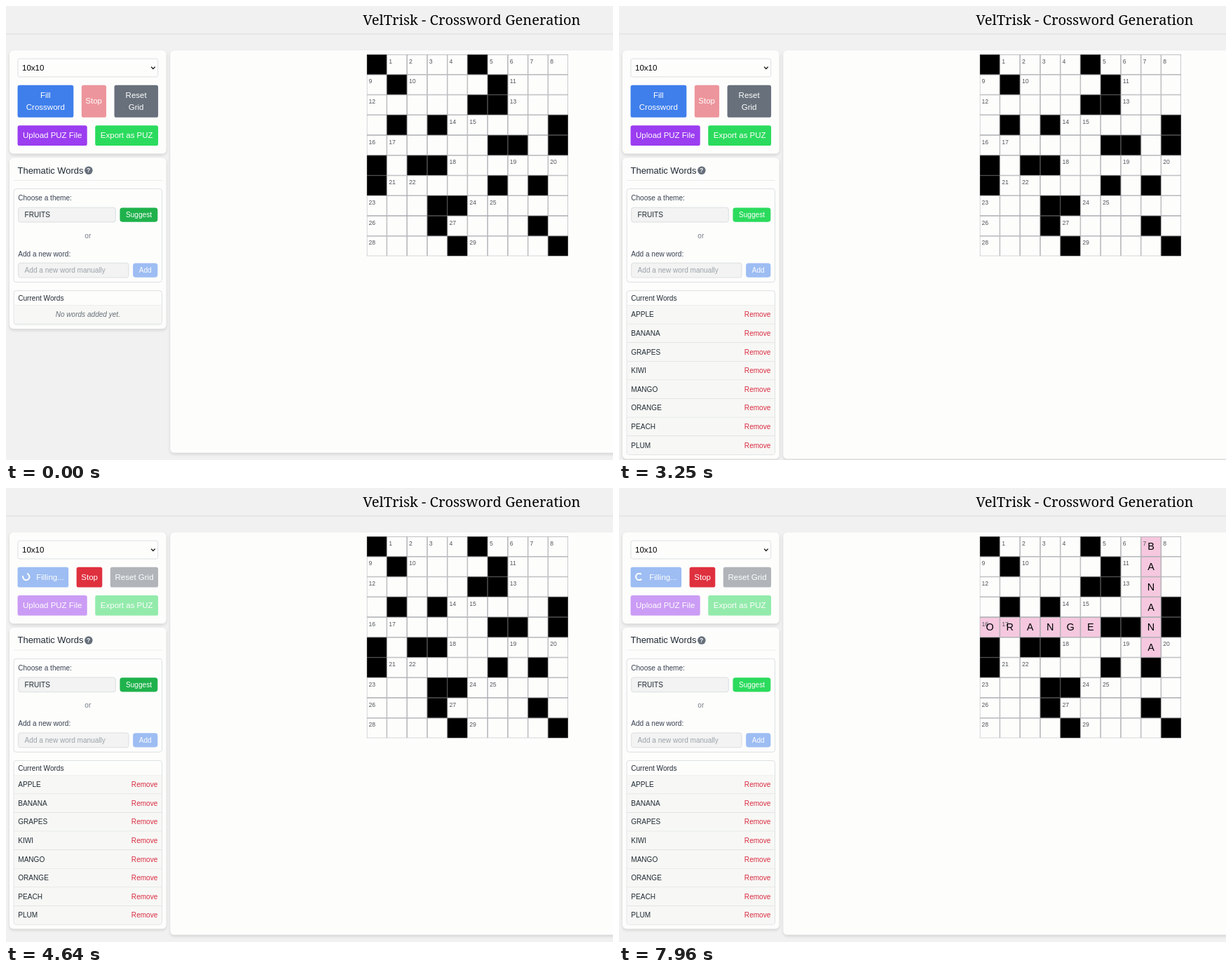
An HTML page that plays this animation: 866 by 647 pixels, repeating every 7.99 s.

```html
<!DOCTYPE html>
<html lang="en">
<head>
<meta charset="utf-8">
<title>Crossword Generation</title>
<style>
  html, body { margin: 0; width: 100%; height: 100%; overflow: hidden; }
  * { box-sizing: border-box; }
  #stage { position: relative; width: 866px; height: 647px; overflow: hidden; background: #f0f1f0; }
  /* The page is laid out at full size and shown reduced. */
  #page {
    position: absolute; left: 0; top: 0; width: 1849px; height: 901px;
    transform: scale(.71875); transform-origin: 0 0;
    color: #1f2933; font: 16px/24px "Liberation Sans", Arial, sans-serif;
    --blue: #3f7fec; --green: #2bdb5d; --line: #d0d5d9;
  }
  header {
    height: 56px; border-bottom: 1px solid #cfd4d7;
    font: 28px/55px "Noto Serif", serif; color: #000; text-align: center;
  }
  .card { background: #fdfdfc; border-radius: 8px; box-shadow: 0 3px 6px rgba(0, 0, 0, .12); }
  aside { position: absolute; left: 7px; top: 88px; width: 311px; }
  main { position: absolute; left: 326px; right: 0; top: 88px; height: 798px; }
  .wide aside { width: 342px; }
  .wide main { left: 357px; }
  .long main { height: 810px; }

  .controls { padding: 16px; display: flex; flex-direction: column; gap: 16px; }
  .select {
    position: relative; height: 37px; padding-left: 8px; color: #000;
    border: 1px solid var(--line); border-radius: 4px; line-height: 35px;
  }
  .select svg { position: absolute; right: 4px; top: 13px; }
  .row { display: flex; gap: 16px; }
  .button {
    padding: 8px; border-radius: 4px; color: #fff; text-align: center;
    background: var(--color);
  }
  .row .button { flex: 1 1 auto; display: flex; align-items: center; justify-content: center; }
  #fill { --color: color-mix(in srgb, #2259de var(--hover, 0%), var(--blue)); }
  #stop { --color: #df303e; }
  #reset { --color: #67707b; }
  #upload { --color: #9b3df0; }
  #export { --color: var(--green); }
  .spinner {
    display: none; flex: none; width: 16px; height: 16px; margin: -3px 12px 0 0;
    border: 3px solid #fff; border-top-color: transparent; border-radius: 50%;
  }
  .filling .spinner { display: block; }

  .words { margin-top: 8px; padding: 8px; }
  h2 {
    margin: 0 0 16px; height: 37px; padding: 0 0 2px 8px; display: flex; align-items: center;
    border-bottom: 1px solid #e3e6e6; font-size: 18px; font-weight: 400;
  }
  h2 i {
    width: 16px; height: 16px; margin-left: 2px; border-radius: 50%; background: #67707b;
    color: #fff; font: bold 12px/16px "Liberation Sans", Arial, sans-serif; text-align: center;
  }
  .box { border: 1px solid var(--line); border-radius: 5px; font-size: 14px; line-height: 20px; }
  .theme { padding: 8px; color: #374151; }
  .line { display: flex; align-items: center; gap: 8px; margin-top: 8px; }
  .input {
    flex: 1; padding: 4px 12px; border: 1px solid var(--line); border-radius: 5px;
    background: #f2f3f2; color: #1f2933; white-space: nowrap;
  }
  .input.fixed { flex: 0 0 194px; }
  .input.hint { color: #9ca3ab; }
  .line .button { flex: none; padding: 4px 12px; border-radius: 5px; }
  #suggest { --color: color-mix(in srgb, #1fb24c var(--hover, 0%), var(--green)); }
  #add { --color: var(--blue); opacity: .5; }
  .or { margin: 16px 0; text-align: center; color: #757d86; }
  .list { margin-top: 16px; overflow: hidden; }
  .list div { display: flex; justify-content: space-between; padding: 8px; border-bottom: 1px solid #d5dadc; }
  .list .head { padding: 4px 8px; border-color: #e6e9e6; }
  .list .item { background: #f7f8f5; }
  .list .item:last-child { border-bottom: 0; }
  .item b { font-weight: 400; color: #d92b42; }
  .list .none { justify-content: center; font-style: italic; color: #666e78; }
  .list .word, .filled .none { display: none !important; }
  .filled .list .word { display: flex !important; }

  #grid { position: absolute; left: 716px; top: 96px; }
  .wide #grid { left: 734px; }
  #grid rect { fill: #fdfdfc; stroke: #a9abae; }
  #grid .black { fill: #000; stroke: #333; }
  #grid .placed rect { fill: #f5c8df; }
  #grid .number { font-size: 12px; fill: #50555a; }
  #grid .letter { font-size: 20px; fill: #000; text-anchor: middle; }
</style>
</head>
<body>
<div id="stage"><div id="page">
  <header>VelTrisk - Crossword Generation</header>
  <aside>
    <section class="card controls">
      <div class="select">10x10
        <svg width="10" height="10" fill="none" stroke="#111" stroke-width="1.8"><path d="M1 2.5 5 6.5 9 2.5"/></svg>
      </div>
      <div class="row">
        <div class="button" id="fill"><span class="spinner"></span><span class="label"></span></div>
        <div class="button" id="stop">Stop</div>
        <div class="button" id="reset">Reset Grid</div>
      </div>
      <div class="row">
        <div class="button" id="upload">Upload PUZ File</div>
        <div class="button" id="export">Export as PUZ</div>
      </div>
    </section>
    <section class="card words">
      <h2>Thematic Words<i>?</i></h2>
      <div class="box theme">
        <div>Choose a theme:</div>
        <div class="line"><div class="input fixed">FRUITS</div><div class="button" id="suggest"></div></div>
        <div class="or">or</div>
        <div>Add a new word:</div>
        <div class="line"><div class="input hint">Add a new word manually</div><div class="button" id="add">Add</div></div>
      </div>
      <div class="box list">
        <div class="head">Current Words</div>
        <div class="item none">No words added yet.</div>
      </div>
    </section>
  </aside>
  <main class="card"></main>
  <svg id="grid" width="400" height="400"></svg>
</div></div>
<script>
const LOOP = 7990, FADE = 150, CELL = 40;
const SUGGEST = 380, WORDS = 2520, FILL = 3720;
const $ = id => document.getElementById(id);
const page = $('page'), grid = $('grid');
const list = document.querySelector('.list');
const spinner = document.querySelector('.spinner');
const fillLabel = document.querySelector('#fill .label');

for (const word of 'APPLE BANANA GRAPES KIWI MANGO ORANGE PEACH PLUM'.split(' ')) {
  list.insertAdjacentHTML('beforeend', `<div class="item word">${word}<b>Remove</b></div>`);
}

const pattern = [
  '#....#....', '.#....#...', '.....##...', '.#.#.....#', '......##.#',
  '#.##......', '#.....#.#.', '...##.....', '...#....#.', '....#....#'
];
const open = (r, c) => pattern[r]?.[c] === '.';

function add(tag, attrs, parent, text = '') {
  const node = document.createElementNS('http://www.w3.org/2000/svg', tag);
  for (const key in attrs) node.setAttribute(key, attrs[key]);
  node.textContent = text;
  return parent.appendChild(node);
}
// The half-pixel inset keeps each cell's border inside the cell.
const addCell = (r, c, parent, cls = '') =>
  add('rect', { x: c * CELL + .5, y: r * CELL + .5, width: CELL - 1, height: CELL - 1, class: cls }, parent);

const layer = () => add('g', {}, grid);
const cells = layer(), placed = layer(), numbers = layer(), letters = layer();
let count = 0;
for (let r = 0; r < 10; r++) for (let c = 0; c < 10; c++) {
  addCell(r, c, cells, open(r, c) ? '' : 'black');
  if (!open(r, c)) continue;
  const across = !open(r, c - 1) && open(r, c + 1);
  const down = !open(r - 1, c) && open(r + 1, c);
  if (across || down) {
    add('text', { x: c * CELL + 4, y: r * CELL + 17.5, class: 'number' }, numbers, ++count);
  }
}

const answers = [
  { word: 'ORANGE', r: 4, c: 0, dr: 0, dc: 1, at: 7600 },
  { word: 'BANANA', r: 0, c: 8, dr: 1, dc: 0, at: 7780 }
];
for (const a of answers) {
  const tint = add('g', { class: 'placed' }, placed), text = add('g', {}, letters);
  [...a.word].forEach((letter, i) => {
    const r = a.r + a.dr * i, c = a.c + a.dc * i;
    addCell(r, c, tint);
    add('text', { x: (c + .5) * CELL, y: (r + .5) * CELL + 7, class: 'letter' }, text, letter);
  });
  a.parts = [tint, text];
}

// Follows a value through timed changes, each one eased over FADE.
function track(t, value, ...changes) {
  for (const [at, to] of changes) {
    const k = Math.min(1, Math.max(0, (t - at) / FADE));
    value += (to - value) * k * k * (3 - 2 * k);
  }
  return value;
}
const setHover = (id, v) => $(id).style.setProperty('--hover', `${v * 100}%`);

function setText(node, text) {
  if (node.textContent !== text) node.textContent = text;
}

function render(t) {
  const busy = t >= SUGGEST && t < WORDS, filled = t >= WORDS, filling = t >= FILL;
  page.classList.toggle('wide', busy);
  page.classList.toggle('filled', filled);
  page.classList.toggle('filling', filling);
  page.classList.toggle('long', filled && !filling);
  setText($('suggest'), busy ? 'Suggesting...' : 'Suggest');
  setText(fillLabel, filling ? 'Filling...' : 'Fill Crossword');

  setHover('suggest', track(t, 1, [SUGGEST, 0], [WORDS, 1], [2950, 0], [4450, 1], [5000, 0]));
  setHover('fill', track(t, 0, [3400, 1], [FILL, 0]));
  $('suggest').style.opacity = track(t, 1, [SUGGEST, .5], [WORDS, 1]);
  $('stop').style.opacity = track(t, .5, [FILL, 1]);
  for (const id of ['fill', 'reset', 'upload', 'export']) {
    $(id).style.opacity = track(t, 1, [FILL, .5]);
  }
  spinner.style.transform = `rotate(${(t - FILL) * .36}deg)`;
  for (const a of answers) {
    for (const part of a.parts) part.style.visibility = t >= a.at ? 'visible' : 'hidden';
  }
}

let start;
function tick(now) {
  start ??= now;
  render((now - start) % LOOP);
  requestAnimationFrame(tick);
}
render(0);
requestAnimationFrame(tick);
</script>
</body>
</html>
```
